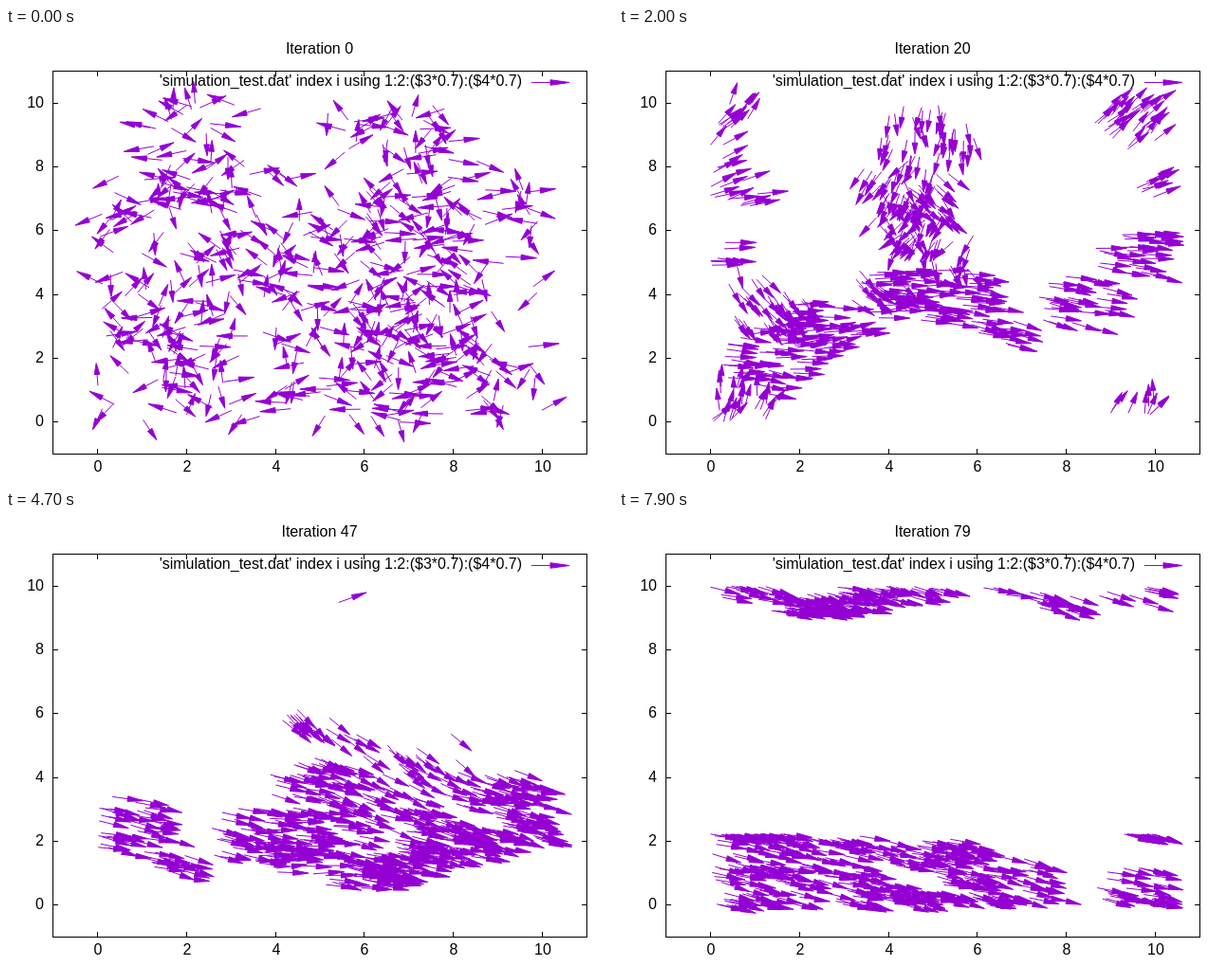
An HTML page with a canvas that plays this animation: 640 by 480 pixels, repeating every 8 s.

```html
<!DOCTYPE html>
<html>
<head>
<meta charset="utf-8">
<style>
  html, body { margin: 0; width: 640px; height: 480px; overflow: hidden; background: #fff; }
  canvas { display: block; }
</style>
</head>
<body>
<canvas id="plot" width="640" height="480"></canvas>
<script>
const ctx = document.getElementById('plot').getContext('2d');
const STEPS = 80, STEP_MS = 100, SPEED = 0.2, ARROW = 0.7;
const START = 12, DENSITY = 48, DRIFT = -17, BAND = 1.5;
const RAD = Math.PI / 180, PURPLE = '#9400d3';
const SX = 563 / 12, SY = 404 / 12;
const px = x => 49.5 + SX * (x + 1);
const py = y => 449.5 - SY * (y + 1);
const wrap = v => ((v % 10) + 10) % 10;
const clamp = (v, m) => Math.max(-m, Math.min(m, v));

let seed = 20117;
function random() {
  seed = (seed + 0x6d2b79f5) | 0;
  let t = Math.imul(seed ^ (seed >>> 15), 1 | seed);
  t = (t + Math.imul(t ^ (t >>> 7), 61 | t)) ^ t;
  return ((t ^ (t >>> 14)) >>> 0) / 4294967296;
}
const spread = () => random() * 2 - 1;

// Flocks at step START: centre x y, radius, heading
const flocks = [
  [0.3, 8.8, 0.8, 83], [8.7, 8, 1, 62], [8.9, 6.6, 0.7, 30], [7.9, 5.2, 0.9, 12],
  [9.5, 2.1, 0.9, -6], [6.6, 4.2, 0.8, -14], [2.6, 3.6, 0.9, 28], [3.7, 4.1, 0.9, 4],
  [4.9, 3.4, 0.6, -16], [0.8, 2.7, 1, 14], [1.2, 5.4, 0.9, -138], [3.1, 5.7, 0.6, -100],
  [4.9, 9.1, 0.8, -118], [3.7, 8.2, 0.85, -55], [5.8, 7.2, 0.95, -128], [5.1, 0.7, 0.9, -103]
];

// Birds turn towards a slowly sinking stream, quickly once they are inside it
function steer(angle, y, step) {
  const centre = 2.6 + SPEED * Math.sin(DRIFT * RAD) * (step - 47);
  const gap = wrap(centre - y + 5) - 5;
  const outside = gap - clamp(gap, BAND);
  const rate = outside ? Math.min(0.15, (step - START) / 265) : 0.12;
  return angle + rate * (DRIFT + 20 * outside - angle);
}

function makeBird([cx, cy, radius, heading]) {
  const r = radius * Math.sqrt(random()), turn = random() * 2 * Math.PI;
  const x0 = cx + r * Math.cos(turn), y0 = cy + r * Math.sin(turn);
  const a0 = heading + 14 * spread(), wild = 95 * spread();
  const track = [];
  const walk = (dir, nextAngle) => {
    let x = x0, y = y0, a = a0;
    for (let k = START; k >= 0 && k < STEPS; k += dir) {
      const noise = (k ? 9 : 180) * spread();
      track[k] = { x: wrap(x), y: wrap(y), a: (a + noise) * RAD };
      a = nextAngle(a, y, k);
      x += dir * SPEED * Math.cos(a * RAD);
      y += dir * SPEED * Math.sin(a * RAD);
    }
  };
  walk(-1, a => a + wild / START);
  walk(1, steer);
  return track;
}
const birds = flocks.flatMap(f =>
  Array.from({ length: Math.round(DENSITY * f[2] ** 2) }, () => makeBird(f)));

function line(x1, y1, x2, y2) {
  ctx.beginPath();
  ctx.moveTo(x1, y1);
  ctx.lineTo(x2, y2);
  ctx.stroke();
}

function arrow(x, y, dx, dy) {
  const len = Math.hypot(dx, dy), wx = 2.8 * dy / len, wy = 2.8 * dx / len;
  const bx = x + dx / 2, by = y + dy / 2;
  line(x, y, bx, by);
  ctx.beginPath();
  ctx.moveTo(x + dx, y + dy);
  ctx.lineTo(bx - wx, by + wy);
  ctx.lineTo(bx + wx, by - wy);
  ctx.closePath();
  ctx.fill();
  ctx.stroke();
}

function text(s, x, y, align) {
  ctx.textAlign = align;
  ctx.fillText(s, x, y);
}

function drawAxes() {
  ctx.strokeRect(49.5, 45.5, 563, 404);
  for (let v = 0; v <= 10; v += 2) {
    const x = Math.floor(px(v)) + 0.5, y = Math.floor(py(v)) + 0.5;
    line(x, 449, x, 444);
    line(x, 46, x, 51);
    line(50, y, 55, y);
    line(612, y, 607, y);
    text(v, x + 0.5, 468, 'center');
    text(v, 40, y + 4.5, 'right');
  }
}

function draw(step) {
  ctx.fillStyle = '#fff';
  ctx.fillRect(0, 0, 640, 480);
  ctx.font = '16px "Liberation Sans", Arial, sans-serif';
  ctx.strokeStyle = ctx.fillStyle = '#000';
  ctx.lineWidth = 1;
  drawAxes();
  text('Iteration ' + step, 330.5, 27, 'center');
  text("'simulation_test.dat' index i using 1:2:($3*0.7):($4*0.7)", 544, 61, 'right');
  ctx.strokeStyle = ctx.fillStyle = PURPLE;
  arrow(554, 57.5, 40, 0);
  for (const track of birds) {
    const { x, y, a } = track[step];
    arrow(px(x), py(y), SX * ARROW * Math.cos(a), -SY * ARROW * Math.sin(a));
  }
}

const t0 = performance.now();
function tick() {
  draw(Math.floor((performance.now() - t0) / STEP_MS) % STEPS);
  requestAnimationFrame(tick);
}
tick();
</script>
</body>
</html>
```
